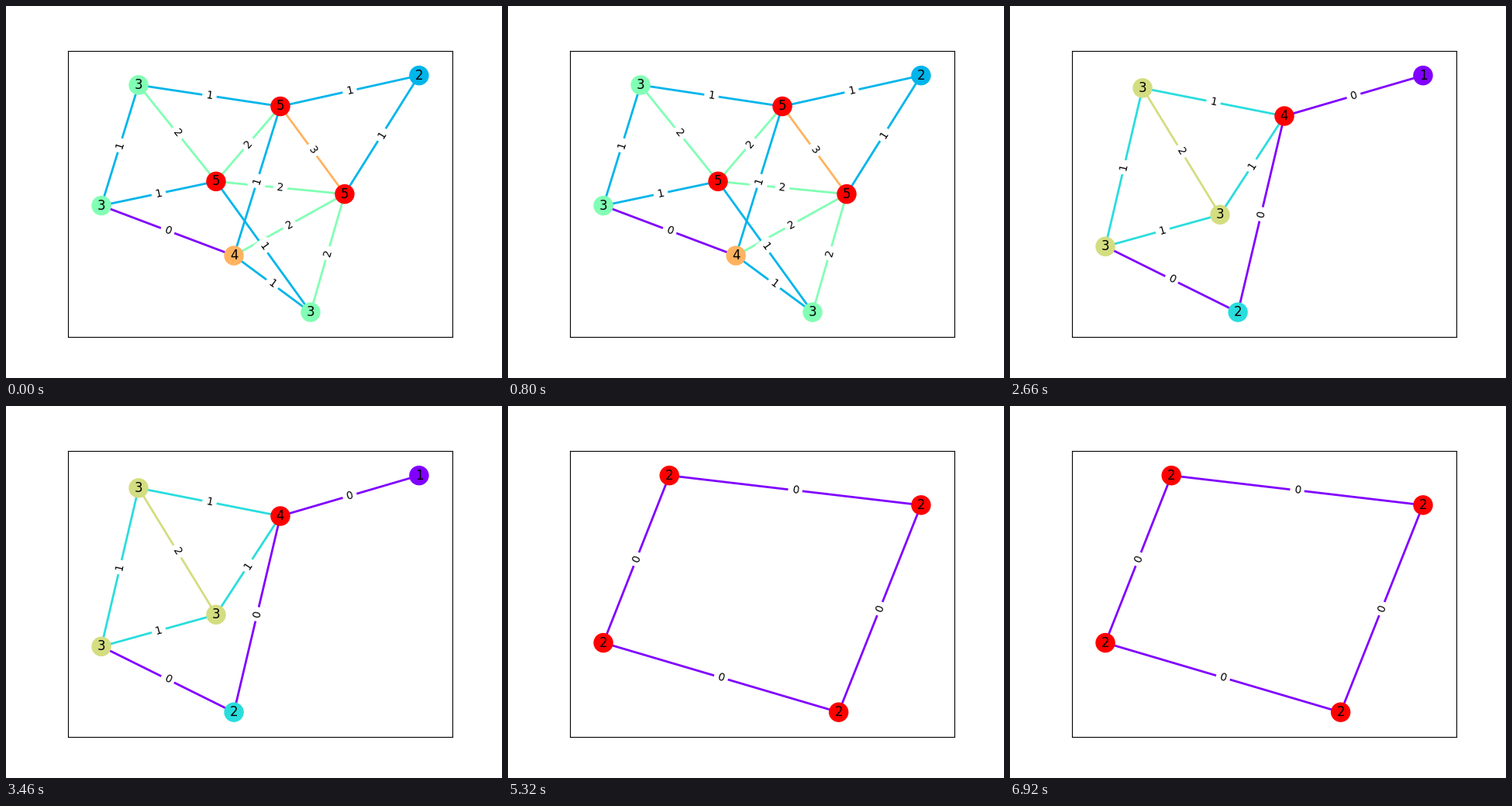
A matplotlib script for the animation above (7980 ms loop, 640 px wide and 480 px high).

```python
from itertools import combinations

import matplotlib.pyplot as plt
import numpy as np
from matplotlib.animation import FuncAnimation
from matplotlib.collections import LineCollection

WIDTH, HEIGHT, DPI = 640, 480, 100
STEP_MS = 1330
STEPS = 6

POS = {
    "A": (171, 102), "B": (354, 129.5), "C": (533, 89.7), "D": (271, 226.3),
    "E": (437, 242.6), "F": (123, 257.5), "G": (294.1, 322), "H": (393, 395),
}
EDGES = "AB AD AF BC BD BE BG CE DE DF DH EG EH FG GH".split()
REMOVED = "HECD"  # one node leaves per step

plt.rcParams["font.family"] = "DejaVu Sans"
cmap = plt.get_cmap("rainbow")
fig = plt.figure(figsize=(WIDTH / DPI, HEIGHT / DPI), dpi=DPI)
ax = fig.add_axes([0.125, 0.11, 0.775, 0.77])


def subgraph(step):
    nodes = [n for n in POS if n not in REMOVED[:step]]
    linked = [e for e in combinations(nodes, 2) if "".join(e) in EDGES]
    near = {n: {m for e in linked if n in e for m in e if m != n} for n in nodes}
    return nodes, linked, near


def fit_view(points):
    """Pad the node extent twice by five percent, y pointing down."""
    low, high = points.min(axis=0), points.max(axis=0)
    pad = (high - low) * 0.105
    (x0, y0), (x1, y1) = low - pad, high + pad
    ax.set(xlim=(x0, x1), ylim=(y1, y0), xticks=[], yticks=[])


def upright_angle(p, q):
    a, b = ax.transData.transform([p, q])
    angle = np.degrees(np.arctan2(b[1] - a[1], b[0] - a[0]))
    return (angle + 90) % 180 - 90


def draw(step):
    nodes, linked, near = subgraph(step)
    points = np.array([POS[n] for n in nodes])
    degree = [len(near[n]) for n in nodes]
    triangles = [len(near[u] & near[v]) for u, v in linked]
    span = max(degree) - 1

    ax.cla()
    fit_view(points)
    lines = [(POS[u], POS[v]) for u, v in linked]
    ax.add_collection(LineCollection(
        lines, colors=[cmap(t / span) for t in triangles],
        linewidths=2, zorder=1), autolim=False)
    ax.scatter(*points.T, s=300, zorder=2, linewidths=1,
               c=[cmap((d - 1) / span) for d in degree])

    for (p, q), count in zip(lines, triangles):
        x, y = np.mean([p, q], axis=0)
        ax.text(x, y, str(count), size=10, ha="center", va="center", zorder=1,
                rotation=upright_angle(p, q),
                bbox=dict(boxstyle="round", ec="white", fc="white"))
    for (x, y), d in zip(points, degree):
        ax.text(x, y, str(d), size=12, ha="center", va="center")
    fit_view(points)


def update(i):
    draw(min(i, len(REMOVED)))  # the last graph holds for two steps
    return []


anim = FuncAnimation(fig, update, frames=STEPS, interval=STEP_MS,
                     init_func=lambda: update(0), repeat=True, repeat_delay=0)
plt.show()
```
